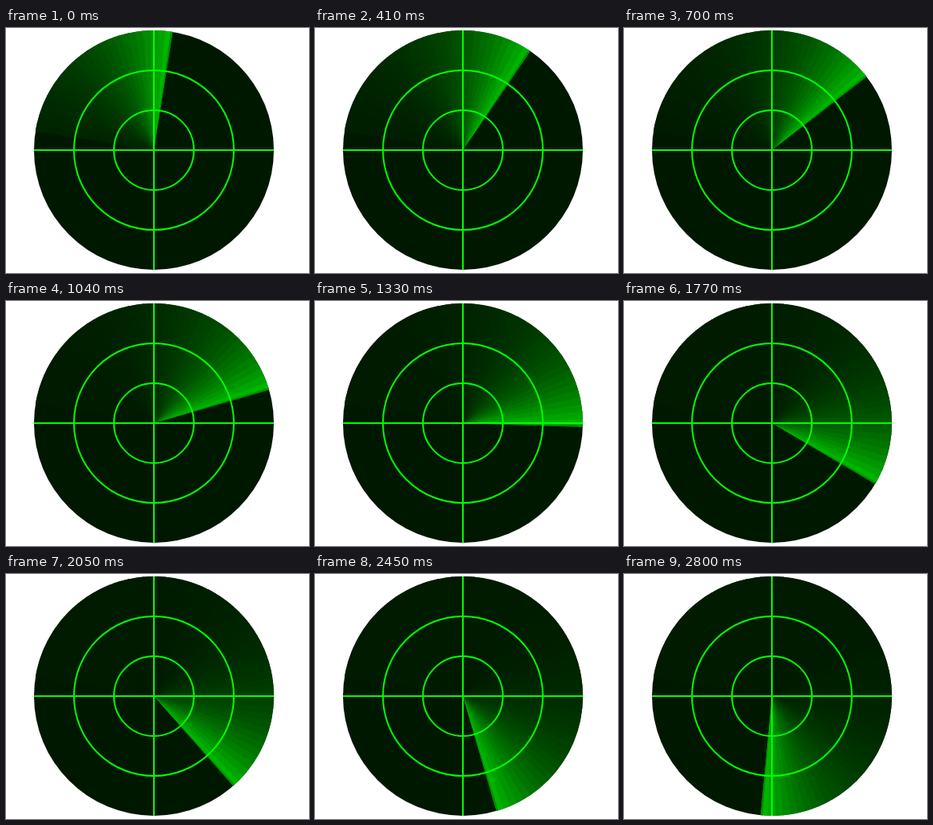
An HTML page with a canvas for the animation above (2.9 s loop, 379x307 px).

```html
<!DOCTYPE html>
<html lang="en">
<head>
<meta charset="utf-8">
<title>Radar sweep</title>
<style>
  html, body { margin: 0; width: 100%; height: 100%; overflow: hidden; background: #fff; }
  canvas { display: block; }
</style>
</head>
<body>
<canvas id="radar" width="379" height="307"></canvas>
<script>
const ctx = document.getElementById('radar').getContext('2d');
const CX = 185, CY = 153, R = 150;
const LOOP = 2900, LAST = 49;
const STEP = 3.6, START = -81, LEAD = 9;   // degrees clockwise from north
const BASE = 24, REST = 27, PEAK = 180, FADE = 0.9;

// Steps take 60 ms, except these, which take 50 ms.
const SHORT = new Set([4, 9, 13, 16, 19, 23, 26, 29, 31, 33, 35, 39, 42, 46]);
const times = [0];
for (let i = 1; i <= LAST; i++) times.push(times[i - 1] + (SHORT.has(i) ? 50 : 60));

const rad = deg => (deg - 90) * Math.PI / 180;
const green = v => `rgb(0,${Math.round(v)},0)`;

function wedge(from, to, level) {
  ctx.fillStyle = green(level);
  ctx.beginPath();
  ctx.moveTo(CX, CY);
  ctx.arc(CX, CY, R, rad(from), rad(to));
  ctx.fill();
}

function ring(r) {
  ctx.beginPath();
  ctx.arc(CX, CY, r, 0, Math.PI * 2);
  ctx.stroke();
}

function line(x1, y1, x2, y2) {
  ctx.beginPath();
  ctx.moveTo(x1, y1);
  ctx.lineTo(x2, y2);
  ctx.stroke();
}

function draw(step) {
  ctx.clearRect(0, 0, 379, 307);
  ctx.fillStyle = green(BASE);
  ctx.beginPath();
  ctx.arc(CX, CY, R, 0, Math.PI * 2);
  ctx.fill();

  const lead = LEAD + step * STEP;
  const count = Math.round((lead - START) / STEP);
  for (let age = count - 1; age >= 0; age--) {
    const from = lead - (age + 1) * STEP;
    // A slight overlap hides the seam to the next wedge.
    const to = Math.min(from + STEP + 0.5, lead);
    wedge(from, to, Math.max(REST, BASE + (PEAK - BASE) * FADE ** age));
  }
  wedge(lead - 0.9, lead, PEAK * 0.78);

  ctx.strokeStyle = '#0f0';
  ctx.lineWidth = 2;
  ring(50);
  ring(100);
  line(CX - R, CY, CX + R, CY);
  line(CX, CY - R, CX, CY + R);
}

const origin = performance.now();
let shown = -1;
function tick() {
  const t = (performance.now() - origin) % LOOP;
  let step = LAST;
  while (times[step] > t) step--;
  if (step !== shown) draw(shown = step);
  requestAnimationFrame(tick);
}
tick();
</script>
</body>
</html>
```
